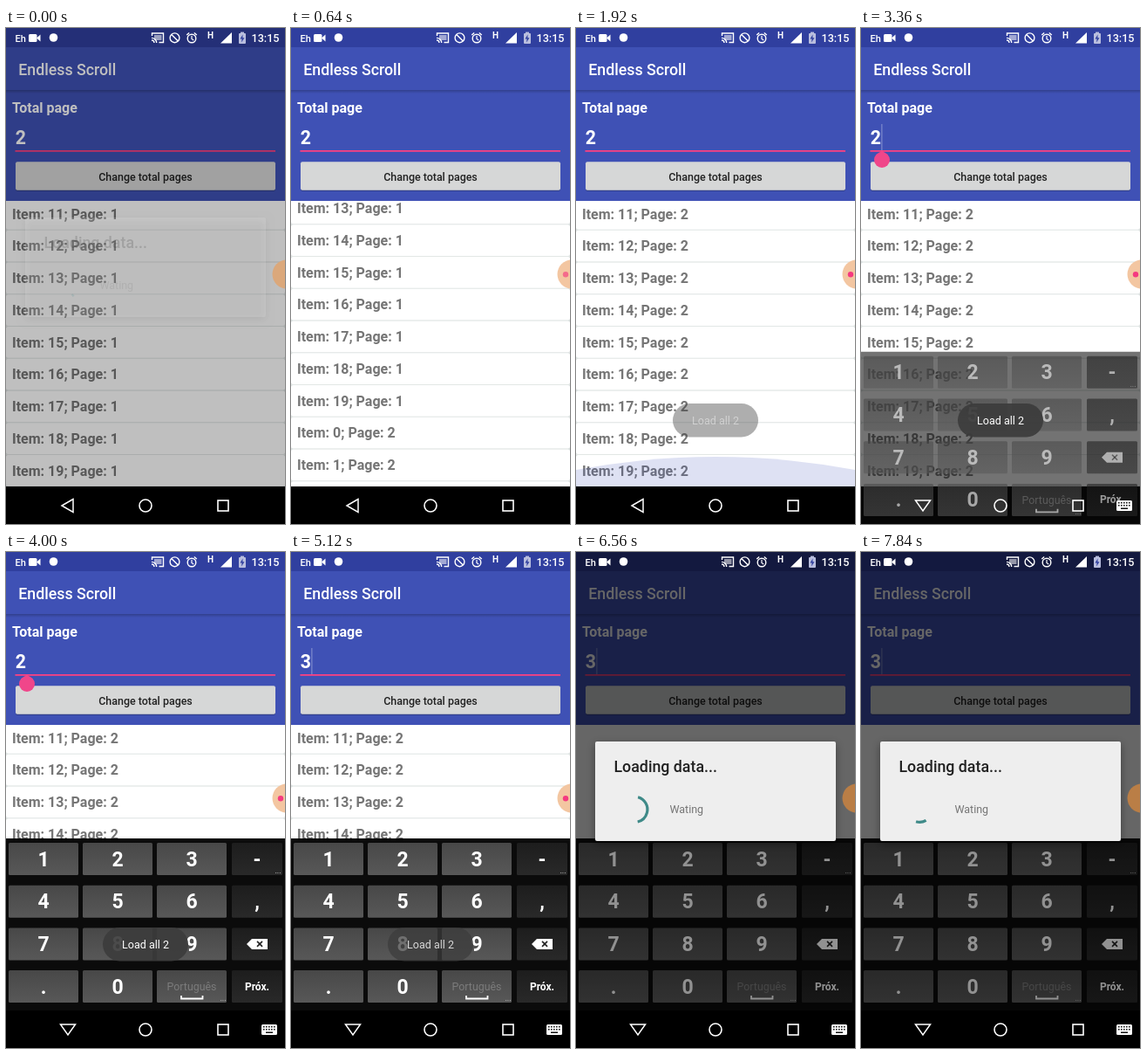
Write an HTML page with a canvas that moves like this. It is 320 px wide and 568 px high and loops after 8000 ms.

```html
<!DOCTYPE html>
<html lang="en">
<head>
<meta charset="utf-8">
<title>Endless Scroll</title>
<style>
html, body { margin: 0; width: 100%; height: 100%; overflow: hidden; background: #000; }
canvas { display: block; width: 320px; height: 568px; }
</style>
</head>
<body>
<canvas id="stage"></canvas>
<script>
const W = 320, H = 568, LOOP = 8000, STEP = 160;
const canvas = document.getElementById('stage');
const ctx = canvas.getContext('2d');
const ratio = window.devicePixelRatio || 1;
canvas.width = W * ratio;
canvas.height = H * ratio;

const clamp = (v) => Math.max(0, Math.min(1, v));
const ramp = (t, from, to) => clamp((t - from) / (to - from));
const mix = (a, b, p) => a + (b - a) * p;
const rad = (deg) => deg * Math.PI / 180;
const easeInOut = (x) => x < 0.5 ? 4 * x ** 3 : 1 - 4 * (1 - x) ** 3;

// Piecewise linear track of [time, value] points.
function track(points, t) {
  let value = points[0][1];
  for (let i = 1; i < points.length; i++) {
    const [t0, v0] = points[i - 1], [t1, v1] = points[i];
    if (t >= t0) value = mix(v0, v1, ramp(t, t0, t1));
  }
  return value;
}

function rect(x, y, w, h, fill, r = 0) {
  ctx.fillStyle = fill;
  ctx.beginPath();
  ctx.roundRect(x, y, w, h, r);
  ctx.fill();
}

function disc(x, y, r, fill) {
  ctx.fillStyle = fill;
  ctx.beginPath();
  ctx.arc(x, y, r, 0, 2 * Math.PI);
  ctx.fill();
}

function shape(points, fill, stroke, width = 1.4) {
  ctx.beginPath();
  points.forEach(([x, y]) => ctx.lineTo(x, y));
  if (fill) { ctx.closePath(); ctx.fillStyle = fill; ctx.fill(); }
  if (stroke) { ctx.strokeStyle = stroke; ctx.lineWidth = width; ctx.stroke(); }
}

function arc(x, y, r, from, to, stroke, width) {
  ctx.strokeStyle = stroke;
  ctx.lineWidth = width;
  ctx.beginPath();
  ctx.arc(x, y, r, rad(from), rad(to));
  ctx.stroke();
}

function text(str, x, y, size, weight, fill, align = 'left') {
  ctx.font = `${weight} ${size}px Roboto, sans-serif`;
  ctx.textAlign = align;
  ctx.fillStyle = fill;
  ctx.fillText(str, x, y);
}

function withAlpha(alpha, draw) {
  if (alpha <= 0) return;
  ctx.save();
  ctx.globalAlpha = alpha;
  draw();
  ctx.restore();
}

const ROW = 36.75;
const SCROLL = [[320, 0], [480, 18], [640, 80], [1000, 300], [1400, 540], [1760, 735]];
const GLOW = [[1680, 0], [1800, 1], [1920, 1], [2560, 0]];
const DIM = [[0, 0.25], [160, 0], [6320, 0], [6520, 0.6]];
const DIALOG = [[0, 0.18], [160, 0], [6320, 0], [6520, 1]];
const TOAST = [[1760, 0], [1920, 0.45], [2080, 1], [5040, 1], [5440, 0]];
const TAP = 3200, ERASE = 4320, TYPE = 4960, SUBMIT = 6320;

function drawHeader(t) {
  rect(0, 0, W, 198, '#3f51b5');
  rect(0, 0, W, 22, '#303f9f');
  const shade = ctx.createLinearGradient(0, 71, 0, 75);
  shade.addColorStop(0, 'rgba(0,0,0,.22)');
  shade.addColorStop(1, 'rgba(0,0,0,0)');
  rect(0, 71, W, 4, shade);
  text('Endless Scroll', 14.2, 54, 17.78, 500, '#fff');
  text('Total page', 7, 96.5, 16, 700, '#fff');
  const value = t < ERASE ? '2' : t < TYPE ? '' : '3';
  text(value, 10.7, 132.5, 21.33, 700, '#fff');
  rect(10.5, 140, 298.5, 1.8, '#ff4081');
  rect(11, 154, 298, 33, 'rgba(0,0,0,.22)', 2);
  rect(11, 153.3, 298, 32.4, '#d6d7d7', 2);
  text('Change total pages', 160, 174.5, 12.44, 500, '#212121', 'center');
  drawCursor(t, value ? 23.4 : 11.5);
}

function drawCursor(t, x) {
  if (t < TAP) return;
  const since = Math.min(t, 6400) - (t < ERASE ? TAP : t < TYPE ? ERASE : TYPE);
  if (since % 1000 < 500) rect(x, 110, 1, 30, 'rgba(255,255,255,.4)');
  if (t < ERASE) {
    disc(24, 151, 9, '#f0468a');
    shape([[24, 140.5], [31, 146], [17, 146]], '#f0468a');
  }
}

function drawList(t) {
  rect(0, 198, W, 327, '#fff');
  if (t >= SUBMIT) return;
  const scroll = track(SCROLL, t);
  const count = t < 320 ? 20 : 40;
  ctx.save();
  ctx.beginPath();
  ctx.rect(0, 198, W, 327);
  ctx.clip();
  for (let i = 0; i < count; i++) {
    const y = 213 + (i - 11) * ROW - scroll;
    if (y < 170 || y > 550) continue;
    rect(0, y - 18.4, W, ROW, '#d9dfde');
    rect(0, y - 17.9, W, ROW - 1, '#fff', 2.5);
    text(`Item: ${i % 20}; Page: ${i < 20 ? 1 : 2}`, 7, y + 5.7, 16, 700, '#757575');
  }
  const glow = track(GLOW, t);
  if (glow > 0) withAlpha(0.17 * glow, () => disc(160, 525 - 34 * glow + 861, 861, '#3f51b5'));
  ctx.restore();
}

function drawKeyboard() {
  const rows = ['123-', '456,', '789<', '.0 >'];
  rect(0, 328, W, 240, '#0b0b0b');
  rows.forEach((row, r) => [...row].forEach((key, c) => {
    const special = c === 3;
    const x = special ? 259 : 3 + c * 85, y = 333 + r * 48.7;
    const w = special ? 58 : 80, cx = x + w / 2, cy = y + 18.5;
    const face = ctx.createLinearGradient(0, y, 0, y + 37);
    face.addColorStop(0, special ? '#1d1d1d' : '#484848');
    face.addColorStop(1, special ? '#292929' : '#585858');
    rect(x, y, w, 37, face, 1.5);
    if (key === '<') drawBackspace(cx, cy);
    else if (key === '>') text('Próx.', cx, cy + 4, 12, 700, '#fff', 'center');
    else if (key === ' ') {
      text('Português', cx, cy + 4.5, 12.4, 400, '#7b7b7b', 'center');
      shape([[201, 508], [201, 511.5], [225.5, 511.5], [225.5, 508]], null, '#fff', 1.8);
    } else text(key, cx, cy + 8, 23, 700, '#fff', 'center');
  }));
  text('...', 312, 368, 8, 700, '#aaa', 'center');
  text('...', 249, 514, 8, 700, '#aaa', 'center');
}

function drawBackspace(x, y) {
  shape([[x - 12, y], [x - 6, y - 6], [x + 12, y - 6], [x + 12, y + 6], [x - 6, y + 6]], '#fff');
  for (const s of [-1, 1]) shape([[x, y - 3 * s], [x + 6, y + 3 * s]], null, '#222', 1.6);
}

function drawNav(ime) {
  const c = '#fff';
  const back = ime ? [[62.5, 541], [79.5, 541], [71, 553], [62.5, 541], [79.5, 541]]
                   : [[64, 547], [77, 539.5], [77, 554.5], [64, 547], [77, 539.5]];
  shape(back, null, c, 1.5);
  arc(160, 547, 7, 0, 360, c, 1.6);
  ctx.strokeRect(243, 541, 12, 12);
  if (!ime) return;
  rect(293, 541, 18, 12, c, 1.5);
  for (let r = 0; r < 2; r++)
    for (let k = 0; k < 5; k++) rect(295 + k * 3, 543 + r * 3, 1.6, 1.6, '#111');
  rect(298, 549.5, 8, 1.5, '#111');
}

function drawStatus() {
  const c = '#fff';
  text('Eh', 10.5, 15.5, 11, 500, c);
  rect(26, 7, 9.5, 9, c, 1.5);
  shape([[35, 11.5], [39.5, 7.5], [39.5, 15.5]], c);
  disc(54.5, 11, 4.8, c);

  shape([[167.5, 9], [167.5, 6], [180.5, 6], [180.5, 16.5], [175.5, 16.5]], null, c, 1.4);
  rect(170, 8, 8.5, 6, 'rgba(255,255,255,.55)');
  arc(167, 17, 3, -90, 0, c, 1.3);
  arc(167, 17, 5.7, -90, 0, c, 1.3);

  arc(193.5, 11.3, 5.4, 0, 360, c, 1.4);
  shape([[189.8, 7.5], [197.3, 15]], null, c);

  arc(213, 12, 4.8, 0, 360, c, 1.4);
  shape([[213, 9], [213, 12.5], [215.3, 14]], null, c, 1.2);
  shape([[207.2, 8], [210.2, 5.5]], null, c);
  shape([[218.8, 8], [215.8, 5.5]], null, c);

  text('H', 231, 12, 10, 700, c);
  shape([[259, 5], [259, 17.5], [246, 17.5]], c);
  rect(267, 6, 8, 12, '#b9bede', 1);
  rect(269, 4.6, 4, 2, '#b9bede');
  shape([[271.5, 7.5], [268.5, 12.5], [270.6, 12.5], [270, 16.5], [273.5, 11.2], [271.4, 11.2]], '#303f9f');
  text('13:15', 281.5, 15.6, 12.6, 500, c);
}

function drawSpinner(t) {
  let start = 46, sweep = 9;
  if (t > 1000) {
    const cycle = (t - 6196) / 1400, half = (cycle - Math.floor(cycle)) * 2;
    const head = easeInOut(clamp(half)), tail = easeInOut(clamp(half - 1));
    sweep = 270 * (head - tail) + 1;
    start = -113.4 + 90 * cycle + 270 * tail + 0.0412 * (t - 6196);
  }
  arc(67.3, 294.8, 14.6, start, start + sweep, '#3f8a88', 3.2);
}

function drawDialog(t) {
  ctx.save();
  ctx.shadowColor = 'rgba(0,0,0,.4)';
  ctx.shadowBlur = 10 * ratio;
  ctx.shadowOffsetY = 3 * ratio;
  rect(22, 217, 276, 114, '#eee', 2);
  ctx.restore();
  text('Loading data...', 43.5, 252, 17.78, 500, '#212121');
  text('Wating', 107.5, 299, 12.44, 400, '#757575');
  drawSpinner(t);
}

function drawToast() {
  rect(111, 430, 98, 38.5, 'rgba(60,60,60,.92)', 19.25);
  text('Load all 2', 160, 454, 12.5, 400, '#fff', 'center');
}

function drawBubble(t, dim) {
  const p = dim / 0.6;
  const tone = [[243, 186], [198, 126], [161, 70]].map(([a, b]) => Math.round(mix(a, b, p)));
  disc(322, 282, 16.5, `rgb(${tone})`);
  if (dim === 0) withAlpha(mix(0.65, 1, ramp(t, 640, 960)), () => disc(315, 282.3, 3.2, '#f53a80'));
}

function render(t) {
  ctx.setTransform(ratio, 0, 0, ratio, 0, 0);
  ctx.textBaseline = 'alphabetic';
  const dim = track(DIM, t);
  const slide = ramp(t, 3200, 3480);
  const keyboard = slide > 0;

  drawList(t);
  drawHeader(t);
  rect(0, 525, W, 43, '#000');
  rect(0, 0, W, keyboard ? 328 : 525, `rgba(0,0,0,${dim})`);
  withAlpha(slide, () => {
    ctx.translate(0, 100 * (1 - slide));
    drawKeyboard();
  });
  if (keyboard) rect(0, 328, W, 240, `rgba(0,0,0,${dim * 0.72})`);
  if (slide === 1) rect(0, 525, W, 43, '#000');
  withAlpha(track(DIALOG, t), () => drawDialog(t));
  withAlpha(track(TOAST, t), drawToast);
  drawNav(keyboard);
  drawStatus();
  drawBubble(t, dim);
}

function tick() {
  const t = performance.now() % LOOP;
  render(Math.floor(t / STEP) * STEP);
  requestAnimationFrame(tick);
}
tick();
</script>
</body>
</html>
```
